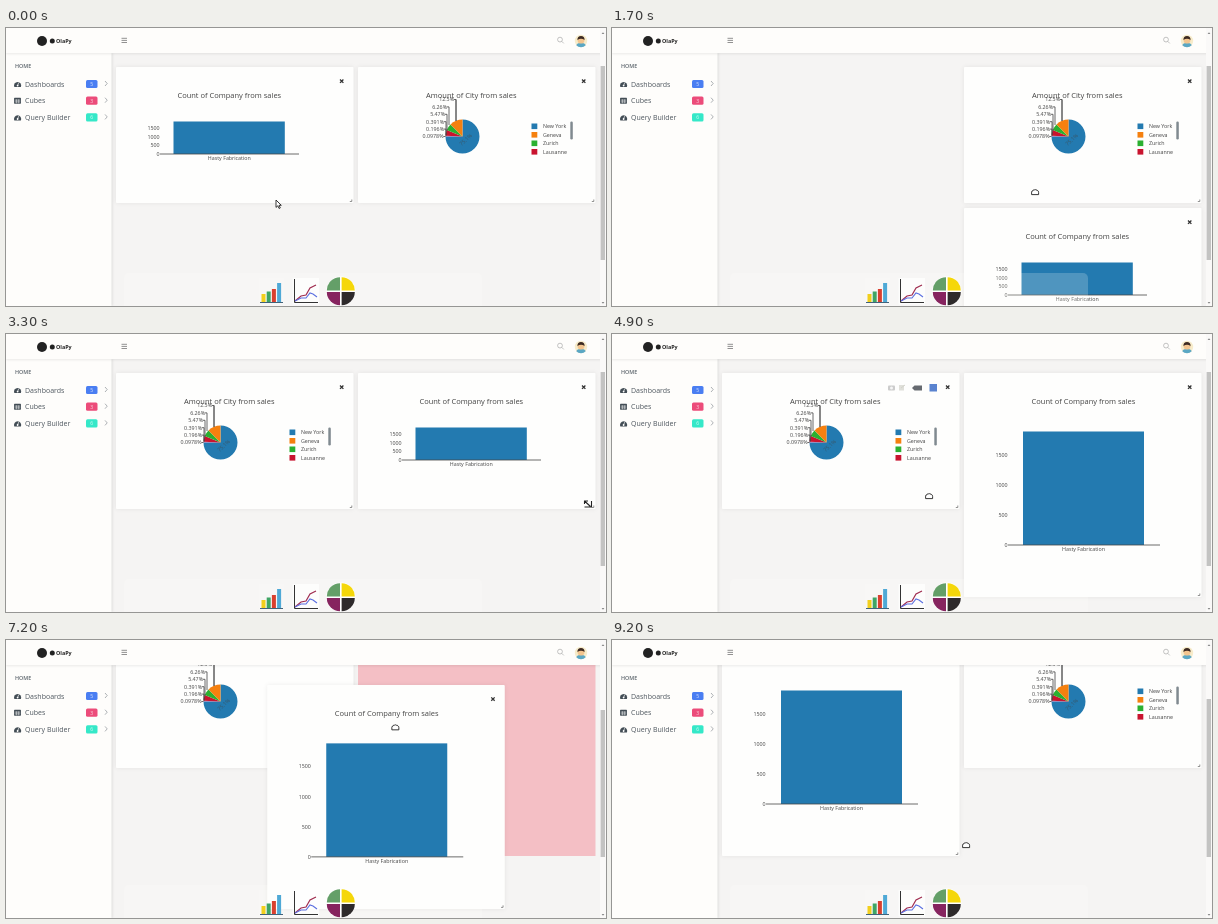
An HTML page for the animation above (9.3 s loop, 600 px wide and 278 px high).

```html
<!DOCTYPE html>
<html lang="en">
<head>
<meta charset="utf-8">
<title>Dashboard</title>
<style>
  html, body { margin: 0; width: 100%; height: 100%; overflow: hidden; background: #f5f4f3; }
  svg { display: block; width: 600px; height: 278px; font-family: "Open Sans", sans-serif; fill: #444; }
  .card { filter: drop-shadow(0 0 2px rgba(0, 0, 0, .07)); }
  .title { font-size: 7.5px; text-anchor: middle; }
  .tick { font-size: 5.3px; }
  .end { text-anchor: end; }
  .mid { text-anchor: middle; }
  .line { fill: none; stroke: #444; stroke-width: .8; }
  .menu { font-size: 7px; fill: #4d565e; }
</style>
</head>
<body>
<svg id="stage" viewBox="0 0 600 278"></svg>
<script>
const LOOP = 9300, STEP = 100, SMALL = 136, BIG = 224, LEFT = 110, RIGHT = 352, TOP = 39, LOW = 180;

// Rows are [time, value, ...], joined by straight moves.
const cursorPath = [
  [0, 270, 172], [300, 220, 66], [1100, 462, 207], [1600, 423, 164], [1700, 423, 164],
  [2600, 181, 166], [2800, 185, 166], [3300, 582, 170], [3500, 582, 170], [4400, 584, 258],
  [4900, 317, 162], [5200, 330, 150], [5700, 567, 195], [6500, 567, 210], [6900, 480, 52],
  [7700, 238, 146], [8000, 300, 104], [8200, 428, 105], [8700, 520, 106], [9200, 354, 205]
];
const countPath = [
  [300, LEFT, TOP], [1100, RIGHT, LOW], [2300, RIGHT, LOW], [2600, RIGHT, TOP],
  [6900, RIGHT, TOP], [7700, LEFT, LOW], [8400, LEFT, LOW], [8700, LEFT, TOP]
];
const amountPath = [
  [1700, RIGHT, TOP], [2200, 230, 46], [2600, LEFT, 41], [2800, LEFT, TOP],
  [8100, LEFT, TOP], [8200, 142, 45.5], [8400, 255, 45], [8700, RIGHT, 41], [8800, RIGHT, TOP]
];
const heightPath = [[3500, SMALL], [4400, BIG]];
const scrollPath = [[5900, 0], [6300, 47]];
const thumbPath = [[5900, 38, 232], [6300, 70, 217], [7200, 70, 217], [7400, 46, 168], [8400, 46, 168], [8600, 59, 217]];

// Drop slots: start, end, x, y, height.
const slots = [
  [300, 700, LEFT, TOP, SMALL], [700, 1100, RIGHT, LOW, SMALL],
  [1800, 2300, RIGHT, TOP, SMALL], [2300, 2800, LEFT, TOP, SMALL],
  [6900, 7300, RIGHT, TOP, BIG], [7300, 7700, LEFT, LOW, BIG],
  [8100, 8400, LEFT, 33, SMALL], [8400, 8800, RIGHT, TOP, SMALL]
];

const mix = (a, b, k) => a + (b - a) * k;

function at(rows, t) {
  const i = rows.findIndex(r => r[0] > t);
  if (i === 0) return rows[0].slice(1);
  if (i < 0) return rows[rows.length - 1].slice(1);
  const a = rows[i - 1], b = rows[i], k = (t - a[0]) / (b[0] - a[0]);
  return a.slice(1).map((v, j) => mix(v, b[j + 1], k));
}

const rect = (x, y, w, h, fill, more = "") =>
  `<rect x="${x}" y="${y}" width="${w}" height="${h}" fill="${fill}" ${more}/>`;
const text = (x, y, cls, str, more = "") => `<text x="${x}" y="${y}" class="${cls}" ${more}>${str}</text>`;
const path = (d, more = 'class="line"') => `<path d="${d}" ${more}/>`;
const circle = (x, y, r, fill) => `<circle cx="${x}" cy="${y}" r="${r}" fill="${fill}"/>`;

// Wedge between two clockwise shares of a full turn, starting at the top.
function wedge(cx, cy, r, from, to, fill) {
  const pt = s => `${cx + r * Math.sin(s * 2 * Math.PI)} ${cy - r * Math.cos(s * 2 * Math.PI)}`;
  return path(`M${cx} ${cy}L${pt(from)}A${r} ${r} 0 ${+(to - from > .5)} 1 ${pt(to)}Z`, `fill="${fill}"`);
}

const frame = h => rect(0, 0, 237.5, h, "#fefefd", 'rx="1"') +
  path("M224 12.5l3.4 3.4m0-3.4l-3.4 3.4", 'stroke="#333" stroke-width="1.3"') +
  path(`M235.8 ${h - 3.5}v2h-2`, 'fill="none" stroke="#777" stroke-width=".8"');

function countCard(h) {
  const k = (h - SMALL) / (BIG - SMALL), base = mix(87, 172, k), unit = mix(8.7, 30.1, k), mid = mix(113.3, 119.5, k);
  const x = mix(57.5, 59, k), top = mix(54.5, 58.5, k);
  let s = frame(h) + text(mid, 31, "title", "Count of Company from sales");
  s += rect(x, top, mix(111.3, 121, k), base - top, "#237ab0");
  for (let i = 0; i < 4; i++) s += text(43.5, base + 1.9 - i * unit, "tick end", i * 500);
  s += path(`M44 ${base}H${mix(183, 196, k)}`);
  return s + text(mid, base + 5.7, "tick mid", "Hasty Fabrication");
}

function amountCard() {
  const blue = "#237ab0", orange = "#f5800f", green = "#2bb030", red = "#c9142f", cx = 104.5, cy = 69.5;
  let s = frame(SMALL) + text(113.3, 31, "title", "Amount of City from sales");
  [[0, .751, blue], [.751, .758, "#8d6bb0"], [.758, .812, red], [.812, .875, green], [.875, 1, orange]]
    .forEach(([a, b, c]) => s += wedge(cx, cy, 17, a, b, c));
  s += text(0, 0, "tick mid", "75.1%", `transform="translate(109 74) rotate(-43)" fill-opacity=".65"`);
  [["12.5%", 96, 54], ["6.26%", 89, 58], ["5.47%", 87, 64], ["0.391%", 86, 68], ["0.196%", 86, 69], ["0.0978%", 85.5, 69.5]]
    .forEach(([label, x, end], i) => {
      const y = 32.5 + i * 7.4;
      s += text(x, y + 1.9, "tick end", label) + path(`M${x} ${y}h2V${end}`);
    });
  s += path("M98 32.5V54");
  [["New York", blue], ["Geneva", orange], ["Zurich", green], ["Lausanne", red]].forEach(([city, c], i) => {
    const y = 59.3 + i * 8.5;
    s += rect(173.5, y - 2.8, 5.8, 5.6, c) + text(185, y + 1.9, "tick", city);
  });
  return s + rect(212.3, 54.5, 2.5, 18, "#808a90", 'rx="1.2"');
}

const chartTools = `<g id="tools">` +
  rect(166, 12.5, 7, 5, "#ccc", 'rx="1"') + circle(169.5, 15, 1.5, "#f6f6f6") +
  rect(177, 12, 5, 5.5, "#e0e0da") + path("M179 15l4-3", 'stroke="#d3d3cb"') +
  path("M190 15l2.5-2.6h7.5v5.2h-7.5z", 'fill="#666a70"') + rect(207.5, 11, 7.5, 7.5, "#5a83cf") + `</g>`;

const gauge = y => path(`M8.3 ${y + 3}a3.6 3.6 0 1 1 6.6 0z`, 'fill="#434d55"') +
  path(`M11.6 ${y + 1.8}l1-3`, 'stroke="#fff" stroke-width=".7"') + circle(11.6, y + 1.6, .9, "#fff");

const grid = y => rect(8, y - 3, 7, 6, "#434d55", 'rx=".7"') +
  path(`M8.6 ${y - .6}h5.8M8.6 ${y + 1.2}h5.8M10.4 ${y - 1.4}v4M12.7 ${y - 1.4}v4`, 'stroke="#fff" stroke-width=".5"');

function sidebar() {
  let s = rect(0, 25, 105.5, 253, "#fefdfb", 'style="filter:drop-shadow(1px 0 1px rgba(0,0,0,.09))"');
  s += text(9, 40, "", "HOME", 'font-size="5.4" font-weight="600" fill="#5d666d"');
  [["Dashboards", "5", "#4a7ef2", gauge], ["Cubes", "3", "#ec4c7a", grid], ["Query Builder", "6", "#35e8c8", gauge]]
    .forEach(([name, n, color, icon], i) => {
      const y = 56 + i * 16.7;
      s += icon(y) + text(19, y + 2.7, "menu", name) + rect(80, y - 4.1, 11.5, 8.2, color, 'rx="1.5"') +
        text(85.7, y + 1.8, "mid", n, 'font-size="5" fill="#fff" fill-opacity=".8"') +
        path(`M99 ${y - 3}l2.2 2.5l-2.2 2.5`, 'fill="none" stroke="#8a9096" stroke-width=".7"');
    });
  return s;
}

function header() {
  return rect(0, 0, 600, 25, "#fefdfb", 'style="filter:drop-shadow(0 1px 1px rgba(0,0,0,.08))"') +
    circle(36, 13, 5, "#222") + circle(46.3, 13, 2.5, "#222") +
    text(50, 15, "", "OlaPy", 'font-size="5.4" font-weight="700" fill="#222"') +
    path("M115.5 10.3h5.5M115.5 12.4h5.5M115.5 14.5h5.5", 'stroke="#777" stroke-width=".8"') +
    `<circle cx="554" cy="11.6" r="2.4" fill="none" stroke="#aaa" stroke-width=".7"/>` +
    path("M555.8 13.4l2 2", 'stroke="#aaa" stroke-width=".7"') +
    circle(575, 13, 6.2, "#f7eccb") + path("M570.3 17.2a4.8 3.2 0 0 1 9.4 0a6.2 6.2 0 0 1-9.4 0", 'fill="#5aa7c4"') +
    circle(575, 12.2, 3.4, "#f3c58f") + path("M571.4 12a3.6 3.9 0 0 1 7.2 0q-3.6-2.6-7.2 0", 'fill="#3d2a22"');
}

function dock() {
  let s = rect(118, 245, 358, 40, "#fffffa", 'rx="5" fill-opacity=".2"');
  s += rect(253, 250, 25, 26, "#fff", 'fill-opacity=".12"');
  [["#f2cf1d", 266], ["#3fa565", 263.5], ["#d9402f", 261], ["#4fa9d6", 255]].forEach(([c, y], i) => {
    s += rect(255.5 + i * 5.2, y, 4, 274 - y, c);
  });
  s += path("M254 274.5h23", 'stroke="#41637a" stroke-width="1"');
  s += rect(286.5, 250, 26.5, 26.5, "#fefefe", 'fill-opacity=".85"') +
    path("M288.5 251v23.5H312", 'fill="none" stroke="#333" stroke-width="1"') +
    path("M289 273l6-5l5-1l4-7l6-3", 'fill="none" stroke="#a02d50" stroke-width="1.2"') +
    path("M289 273l6-3l5 0l4-5l3 1l4 3", 'fill="none" stroke="#5b6fe0" stroke-width="1.1"');
  s += circle(334.8, 263.2, 14.6, "#fff");
  ["#f5d70a", "#2e2a2b", "#86245f", "#649f68"].forEach((c, i) => {
    const dx = i < 2 ? .8 : -.8, dy = i === 1 || i === 2 ? .8 : -.8;
    s += wedge(334.8 + dx, 263.2 + dy, 13.2, i / 4, (i + 1) / 4, c);
  });
  return s;
}

const outline = 'fill="#fff" stroke="#222" stroke-width=".9" stroke-linejoin="round"';
const cursors = {
  arrow: path("M0 0v7.4l1.8-1.6l1.3 2.7l1.2-.6l-1.3-2.6h2.3z", outline),
  hand: path("M-3.4 2.6v-2.5q.1-1.4 1.2-1.2q.3-1.4 1.5-1q1-.7 1.7.1q1.3-.4 1.6.8q1.2.2 1 1.6v2.2z", outline),
  resize: path("M-3.5-3l6 5.5M3.5-3v6h-7M-3.5 0v-3H0", 'fill="none" stroke="#222" stroke-width="1.1"')
};

const $ = id => document.getElementById(id);
$("stage").innerHTML = rect(0, 0, 600, 278, "#f5f4f3") +
  `<rect id="slot" width="237.5" fill="#f4bfc5"/>` +
  `<g id="cards"><g id="count" class="card"></g><g id="amount" class="card">${amountCard()}${chartTools}</g></g>` +
  dock() + sidebar() + header() +
  rect(594, 0, 6, 278, "#faf9f8") +
  path("M595.6 6l1.4-1.8l1.4 1.8zM595.6 274l1.4 1.8l1.4-1.8z", 'fill="#888"') +
  `<rect id="thumb" x="594.6" width="4.4" fill="#c3c3c2"/>` +
  Object.keys(cursors).map(k => `<g id="${k}">${cursors[k]}</g>`).join("");

const place = (id, x, y) => $(id).setAttribute("transform", `translate(${x} ${y})`);
const show = (id, on) => $(id).setAttribute("visibility", on ? "visible" : "hidden");

let lastHeight = 0;
function draw(t) {
  const [scroll] = at(scrollPath, t), [h] = at(heightPath, t);
  if (h !== lastHeight) $("count").innerHTML = countCard(lastHeight = h);

  const [cx, cy] = at(countPath, t), [ax, ay] = at(amountPath, t);
  place("count", cx, cy - scroll);
  place("amount", ax, ay - scroll);
  const front = t < 1500 || (t >= 6900 && t < 7900) ? $("count") : $("amount");
  if ($("cards").lastChild !== front) $("cards").appendChild(front);
  show("tools", t >= 4600 && t < 5400);

  const slot = slots.find(s => t >= s[0] && t < s[1]);
  show("slot", slot);
  if (slot) {
    place("slot", slot[2], slot[3] - scroll);
    $("slot").setAttribute("height", slot[4]);
  }

  const [y0, y1] = at(thumbPath, t);
  $("thumb").setAttribute("y", y0);
  $("thumb").setAttribute("height", y1 - y0);

  const [mx, my] = at(cursorPath, t);
  const kind = t < 200 ? "arrow" : t >= 3200 && t < 4500 ? "resize" : "hand";
  for (const k in cursors) {
    show(k, k === kind);
    place(k, mx, my);
  }
}

const start = performance.now();
function tick() {
  const t = (performance.now() - start) % LOOP;
  draw(Math.floor(t / STEP) * STEP);
  requestAnimationFrame(tick);
}
tick();
</script>
</body>
</html>
```
